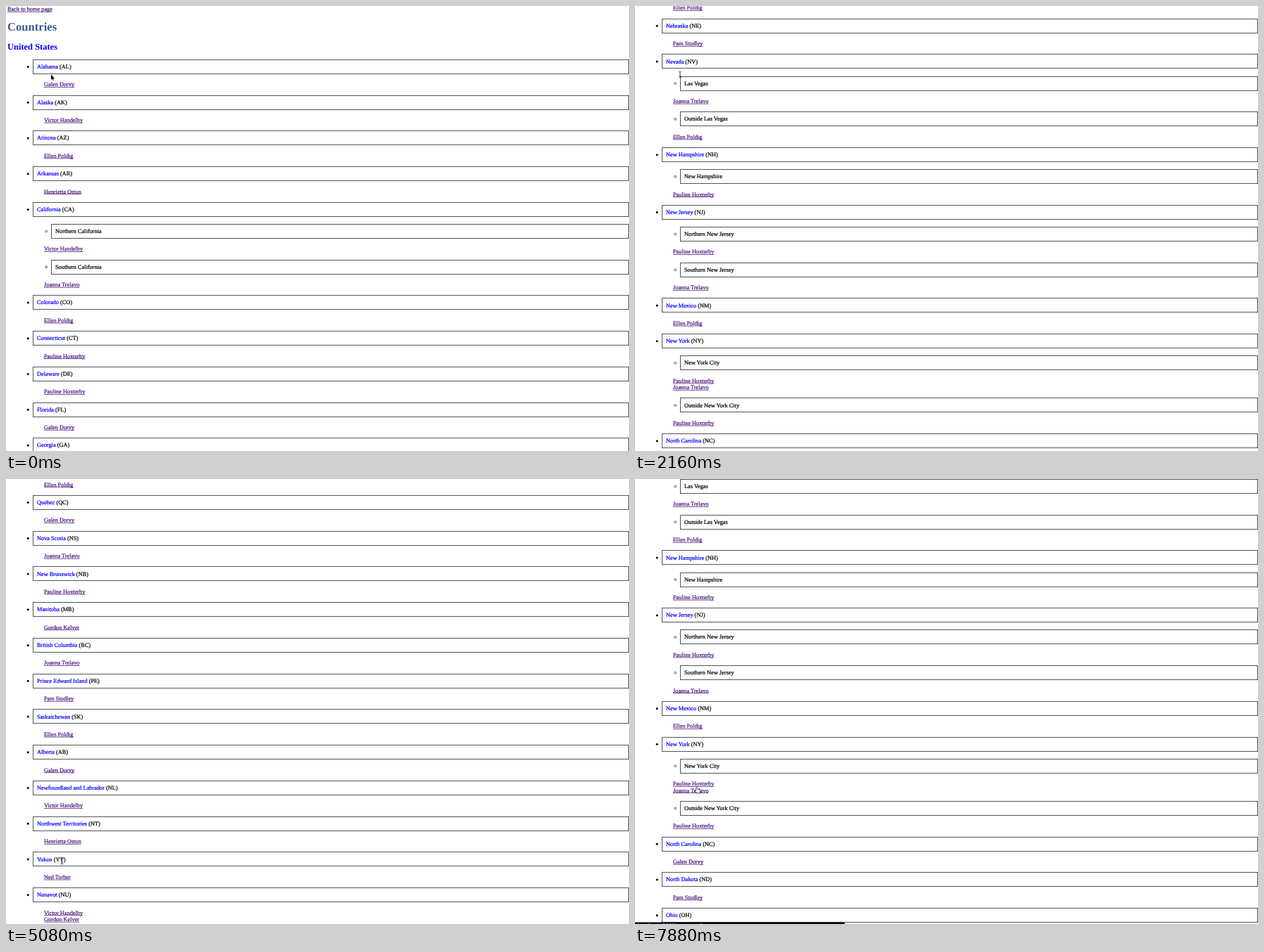
Recreate the animation shown at these times as an HTML page with a canvas. Size 885 by 633 pixels, loop 8000 ms.

```html
<!DOCTYPE html>
<html lang="en">
<head>
<meta charset="utf-8">
<title>Countries</title>
<style>
html, body { margin: 0; width: 100%; height: 100%; overflow: hidden; background: #fff; }
canvas { display: block; }
</style>
</head>
<body>
<canvas id="stage" width="885" height="633"></canvas>
<script>
const W = 885, H = 633, LOOP = 8000;
const ctx = document.getElementById('stage').getContext('2d');
const SERIF = '"Liberation Serif", Times, serif';
const TEXT = 8.32, PITCH = 50.75, SUB_GAP = 31.1, LINE = 9.36;
const LINK = '#4b157f', BLUE = '#0000ff', BORDER = '#555';

const people = {
  g: 'Galen Dorvy', v: 'Victor Handelby', e: 'Ellen Poldig', h: 'Henrietta Ostun',
  j: 'Joanna Trelavo', p: 'Pauline Hoxterby', o: 'Gordon Kelver', n: 'Ned Torber', s: 'Pam Stodley'
};

// Region,code,people  or  Region,code,area:people,area:people
const countries = {
  'United States': `Alabama,AL,g|Alaska,AK,v|Arizona,AZ,e|Arkansas,AR,h
California,CA,Northern California:v,Southern California:j
Colorado,CO,e|Connecticut,CT,p|Delaware,DE,p|Florida,FL,g|Georgia,GA,g
Hawaii,HI,v|Idaho,ID,e|Illinois,IL,n|Indiana,IN,o|Iowa,IA,s|Kansas,KS,n
Kentucky,KY,o|Louisiana,LA,h|Maine,ME,p|Maryland,MD,j|Massachusetts,MA,p
Michigan,MI,o|Minnesota,MN,n|Mississippi,MS,g
Missouri,MO,St. Louis Area:g,Kansas City Area:n
Montana,MT,e|Nebraska,NE,s
Nevada,NV,Las Vegas:j,Outside Las Vegas:e
New Hampshire,NH,New Hampshire:p
New Jersey,NJ,Northern New Jersey:p,Southern New Jersey:j
New Mexico,NM,e
New York,NY,New York City:pj,Outside New York City:p
North Carolina,NC,g|North Dakota,ND,s|Ohio,OH,o|Oklahoma,OK,h|Oregon,OR,e
Pennsylvania,PA,p|Rhode Island,RI,p|South Carolina,SC,g|South Dakota,SD,s
Tennessee,TN,g|Texas,TX,h|Utah,UT,e|Vermont,VT,p
Virginia,VA,Northern Virginia:j,Southern Virginia:g
Washington,WA,v|West Virginia,WV,o|Wisconsin,WI,n|Wyoming,WY,e`,
  'Canada': `Ontario,ON,e|Quebec,QC,g|Nova Scotia,NS,j|New Brunswick,NB,p
Manitoba,MB,o|British Columbia,BC,j|Prince Edward Island,PE,s
Saskatchewan,SK,e|Alberta,AB,g|Newfoundland and Labrador,NL,v
Northwest Territories,NT,h|Yukon,YT,n|Nunavut,NU,vo`
};

// Each flick scrolls in a few hard steps that slow down towards its end.
const flicks = [
  { from: 140, to: 1090, steps: 5, y: 728.8 },
  { from: 1300, to: 2160, steps: 5, y: 1541.3 },
  { from: 2370, to: 3230, steps: 5, y: 2685.5 },
  { from: 3470, to: 4420, steps: 5, y: 3194 },
  { from: 4660, to: 5080, steps: 3, y: 3197.4 },
  { from: 5530, to: 6130, steps: 4, y: 1001.1 },
  { from: 6490, to: 6930, steps: 3, y: 1640.9 }
];

const glides = [
  { from: 4660, to: 5080, steps: 3, x: 79.5, y: 544 },
  { from: 7590, to: 7880, steps: 3, x: 88, y: 439 }
];

function progress({ from, to, steps }, t) {
  const step = Math.floor((t - from) / (to - from) * (steps - 1) + 1.08);
  const u = Math.min(Math.max(step / steps, 0), 1);
  return 1 - (1 - u) ** 1.5;
}

const follow = (moves, key, start, t) =>
  moves.reduce((value, move) => value + (move[key] - value) * progress(move, t), start);

const rows = [];
const add = (y, draw) => rows.push({ y, draw });

// The thin outline gives the text the weight of smoothed type.
function text(str, x, y, color, font = `${TEXT}px ${SERIF}`, weight = 0.22) {
  ctx.font = font;
  ctx.fillStyle = ctx.strokeStyle = color;
  ctx.lineWidth = weight;
  ctx.fillText(str, x, y);
  if (weight) ctx.strokeText(str, x, y);
  return ctx.measureText(str).width;
}

function link(str, x, y) {
  const w = text(str, x, y + 2.75, LINK);
  ctx.fillRect(x, y + 3.5, w, 0.75);
}

function box(x, y) {
  ctx.strokeStyle = BORDER;
  ctx.lineWidth = 1;
  ctx.strokeRect(x + 0.5, Math.round(y - 10.3) + 0.5, W - 1 - x, 20);
}

function dot(x, y, r, hollow) {
  ctx.beginPath();
  ctx.arc(x, y, r, 0, Math.PI * 2);
  ctx.lineWidth = 0.6;
  ctx.strokeStyle = ctx.fillStyle = '#000';
  hollow ? ctx.stroke() : ctx.fill();
}

function region(name, code, y) {
  dot(31.3, y + 0.3, 1.5);
  box(38, y);
  const w = text(name, 44, y + 2.75, BLUE);
  text(` (${code})`, 44 + w, y + 2.75, '#000');
}

function area(name, y) {
  dot(57.2, y + 0.3, 1.4, true);
  box(64, y);
  text(name, 70, y + 2.75, '#000');
}

function heading(str, y, size, color) {
  add(y, y => text(str, 2, y + size * 0.33, color, `bold ${size}px ${SERIF}`, 0));
}

// Adds the links below a box and returns the centre of the next box.
function contacts(ids, y) {
  [...ids].forEach((id, i) => add(y + 25.4 + i * LINE, y => link(people[id], 54, y)));
  return y + PITCH + (ids.length - 1) * LINE;
}

function layout() {
  add(4.4, y => link('Back to home page', 2, y));
  heading('Countries', 29.9, 16.64, '#3b5998');
  let y = 58.1;
  for (const [country, list] of Object.entries(countries)) {
    heading(country, y, 12.48, BLUE);
    y += 28;
    for (const entry of list.split(/[|\n]/)) {
      const [name, code, ...parts] = entry.split(',');
      add(y, y => region(name, code, y));
      if (!parts[0].includes(':')) {
        y = contacts(parts[0], y);
        continue;
      }
      y += SUB_GAP;
      for (const part of parts) {
        const [label, ids] = part.split(':');
        add(y, y => area(label, y));
        y = contacts(ids, y);
      }
    }
    y -= 3.25;
  }
}

function shape(points, fill, stroke, width) {
  ctx.beginPath();
  points.forEach(([x, y]) => ctx.lineTo(x, y));
  ctx.closePath();
  ctx.lineJoin = 'round';
  ctx.lineWidth = width;
  ctx.strokeStyle = stroke;
  ctx.fillStyle = fill;
  ctx.stroke();
  ctx.fill();
}

function arrow() {
  shape([[0, 0], [0, 7.4], [1.7, 5.9], [2.9, 8.6], [4, 8.1], [2.8, 5.4], [5, 5.4]], '#000', '#fff', 1);
}

function beam() {
  ctx.strokeStyle = '#222';
  ctx.lineWidth = 0.8;
  ctx.beginPath();
  for (const s of [-1, 1]) {
    ctx.moveTo(-2, s * 4);
    ctx.quadraticCurveTo(0, s * 4, 0, s * 3);
    ctx.quadraticCurveTo(0, s * 4, 2, s * 4);
  }
  ctx.moveTo(0, -3);
  ctx.lineTo(0, 3);
  ctx.moveTo(-1, 1.4);
  ctx.lineTo(1, 1.4);
  ctx.stroke();
}

function hand() {
  shape([[-1, 0], [0.2, 0], [0.6, 2.6], [3.6, 3.2], [4.2, 4.2], [3.6, 7.6], [0, 7.6],
    [-2.8, 4.6], [-2.2, 3.8], [-0.8, 4.6]], '#fff', '#000', 1.2);
}

function pointer(t) {
  const draw = t < 1300 ? arrow : t < 5530 ? beam : t < 6930 ? arrow : hand;
  ctx.save();
  ctx.translate(follow(glides, 'x', 64, t), follow(glides, 'y', 97.5, t));
  draw();
  ctx.restore();
}

function statusBar(path) {
  ctx.fillStyle = '#0d0218';
  ctx.beginPath();
  ctx.roundRect(-4, 630.6, 302, 10, 2);
  ctx.fill();
  text('localhost:3000/' + path, 3, 637.6, '#cfc8da', '8px "Open Sans", sans-serif', 0);
}

function render(t) {
  const scroll = follow(flicks, 'y', 0, t);
  ctx.fillStyle = '#fff';
  ctx.fillRect(0, 0, W, H);
  for (const { y, draw } of rows) {
    const top = y - scroll;
    if (top > -20 && top < H + 20) draw(top);
  }
  if (t >= 6930) statusBar(t < 7590 ? 'contacts/galen' : 'contacts/joanna');
  pointer(t);
}

ctx.textRendering = 'geometricPrecision';
layout();
const start = performance.now();
function tick() {
  render((performance.now() - start) % LOOP);
  requestAnimationFrame(tick);
}
tick();
</script>
</body>
</html>
```
